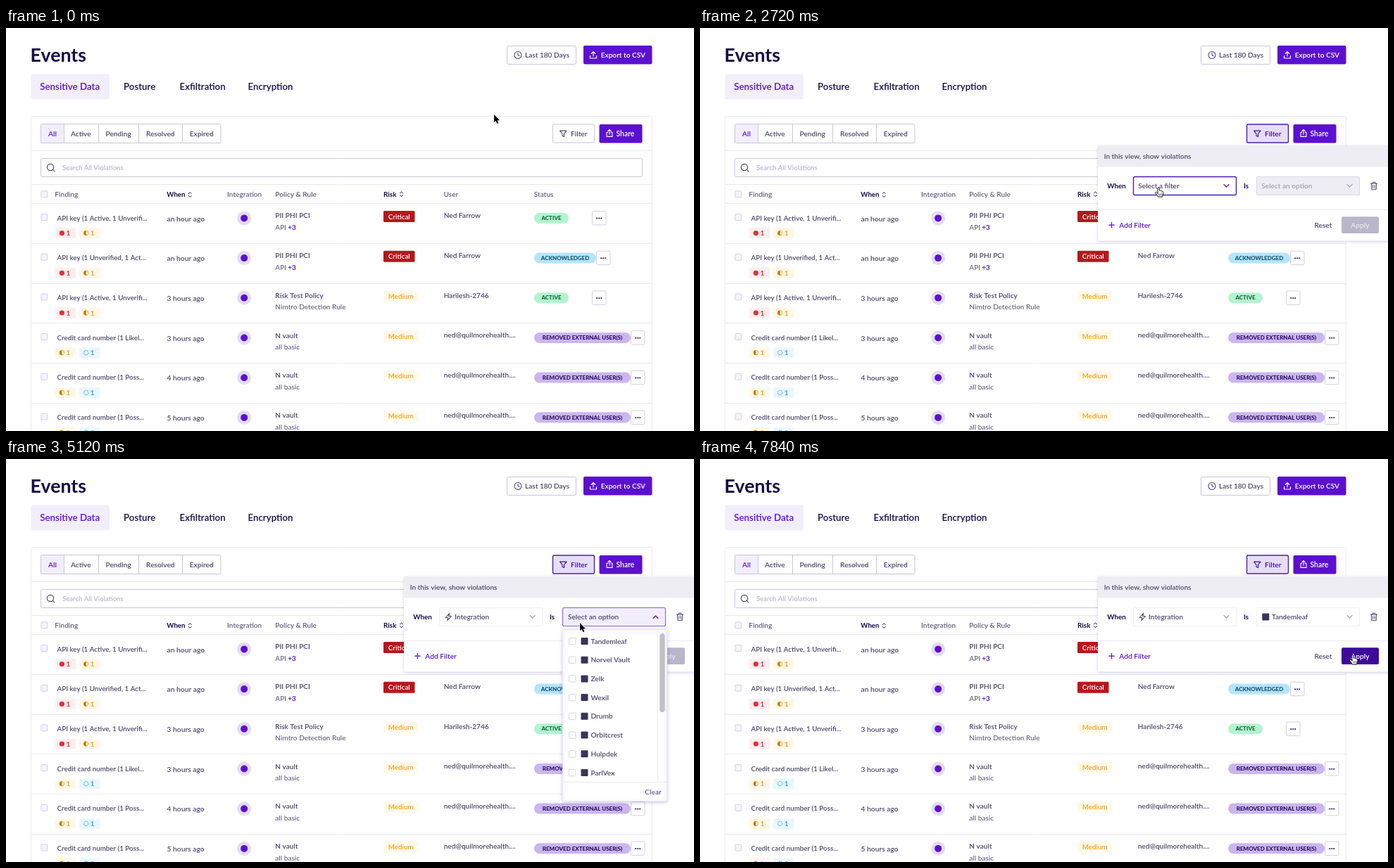
Write an HTML page with a canvas that moves like this. It is 977 px wide and 573 px high and loops after 8000 ms.

```html
<!DOCTYPE html>
<html lang="en">
<head>
<meta charset="utf-8">
<title>Events</title>
<style>
html, body { margin: 0; width: 100%; height: 100%; overflow: hidden; background: #fff; }
canvas { display: block; }
</style>
</head>
<body>
<canvas id="stage" width="977" height="573"></canvas>
<script>
const ctx = document.getElementById('stage').getContext('2d');
const LOOP = 8000;
const PURPLE = '#5b10d0', DEEP = '#3d0a9c', FOCUS = '#4c1fae', INK = '#150b45', TEXT = '#4b4867', MUTED = '#625f7e';
const LILAC = '#f2eefc', LINE = '#ebe9f1', EDGE = '#c9c6d8', PALE = '#b4b1c4';

// Moments at which the interface changes state
const OPEN_PANEL = 1120, ADD_ROW = 2240, OPEN_FIELDS = 2960, PICK_FIELD = 3760,
      OPEN_APPS = 4960, CHECK_APP = 5520, CLOSE_APPS = 6160;
const CLICKS = [1000, 2160, 2880, 3760, 4760, 5440, 6080];

// Pointer stops: time, x, y
const PATH = [
  [0, 693, 123], [160, 693, 123], [900, 803, 152], [1200, 803, 152], [1680, 678, 219],
  [1920, 630, 221], [2240, 630, 221], [2680, 651, 228], [3100, 651, 228], [3460, 658, 298],
  [4000, 658, 298], [4560, 815, 233], [5160, 815, 233], [5440, 806, 259], [5900, 806, 259],
  [6160, 741, 252], [6860, 741, 252], [7680, 927, 280], [8000, 927, 280]
];

const APPS = ['Tandemleaf', 'Norvel Vault', 'Zelk', 'Wexil', 'Drumb', 'Orbitcrest', 'Hulpdek', 'ParlVex'];
const FIELDS = ['Finding', 'Integration', 'Policy', 'Risk', 'User', 'Status'];

const MAIL = 'ned@quilmorehealth....';
const ROWS = [
  ['API key (1 Active, 1 Unverifi...', 'an hour ago', 'PII PHI PCI', 'API', 'Critical', 'Ned Farrow', 'ACTIVE'],
  ['API key (1 Unverified, 1 Act...', 'an hour ago', 'PII PHI PCI', 'API', 'Critical', 'Ned Farrow', 'ACKNOWLEDGED'],
  ['API key (1 Active, 1 Unverifi...', '3 hours ago', 'Risk Test Policy', 'Nimtro Detection Rule', 'Medium', 'Harilesh-2746', 'ACTIVE'],
  ['Credit card number (1 Likel...', '3 hours ago', 'N vault', 'all basic', 'Medium', MAIL, 'REMOVED EXTERNAL USER(S)'],
  ['Credit card number (1 Poss...', '4 hours ago', 'N vault', 'all basic', 'Medium', MAIL, 'REMOVED EXTERNAL USER(S)'],
  ['Credit card number (1 Poss...', '5 hours ago', 'N vault', 'all basic', 'Medium', MAIL, 'REMOVED EXTERNAL USER(S)']
];
const STATUS = {
  'ACTIVE': { fill: '#b4f3cf', ink: '#11613c', width: 49, menu: 832.5 },
  'ACKNOWLEDGED': { fill: '#b5e4fb', ink: '#145072', width: 88, menu: 838.5 },
  'REMOVED EXTERNAL USER(S)': { fill: '#cbb6ef', ink: '#2a0b66', width: 137, menu: 887.5 }
};

// y is the middle of the capital letters
function text(str, x, y, color = TEXT, size = 10.1, weight = 600, align = 'left') {
  ctx.font = `${weight} ${size}px Lato, sans-serif`;
  ctx.fillStyle = color;
  ctx.textAlign = align;
  ctx.fillText(str, x, y + size * 0.36);
}

function box(x, y, w, h, r, fill, stroke, width = 1) {
  ctx.beginPath();
  ctx.roundRect(x, y, w, h, r);
  paint(fill, stroke, width);
}

function disc(x, y, r, fill, stroke, width = 1) {
  ctx.beginPath();
  ctx.arc(x, y, r, 0, Math.PI * 2);
  paint(fill, stroke, width);
}

function paint(fill, stroke, width) {
  if (fill) { ctx.fillStyle = fill; ctx.fill(); }
  if (stroke) { ctx.strokeStyle = stroke; ctx.lineWidth = width; ctx.stroke(); }
}

function shape(d, x, y, stroke, width = 1.2, fill) {
  ctx.save();
  ctx.translate(x, y);
  ctx.lineCap = ctx.lineJoin = 'round';
  ctx.strokeStyle = stroke;
  ctx.lineWidth = width;
  const path = new Path2D(d);
  if (fill) { ctx.fillStyle = fill; ctx.fill(path); }
  if (stroke) ctx.stroke(path);
  ctx.restore();
}

function rule(x1, y1, x2, y2, color = LINE) {
  shape(`M${x1} ${y1}L${x2} ${y2}`, 0, 0, color, 1);
}

function withShadow(blur, offset, draw) {
  ctx.save();
  ctx.shadowColor = 'rgba(80,55,160,.24)';
  ctx.shadowBlur = blur;
  ctx.shadowOffsetY = offset;
  draw();
  ctx.restore();
}

const checkbox = (x, y) => box(x - 4.5, y - 4.5, 9, 9, 1.5, '#f5f4f8', '#d3d0df');
const chevron = (x, y, color, up) => shape(up ? 'M-3.5 2L0-1.5L3.5 2' : 'M-3.5-2L0 1.5L3.5-2', x, y, color, 1.3);
const sorter = (x, y) => shape('M-2-1.5L0-3.3L2-1.5M-2 1.5L0 3.3L2 1.5', x, y, INK, 1);
const upload = (x, y) => shape('M-4.5 1V4.5H4.5V1M0 1.5V-4.8M-2.7-2.2L0-4.8L2.7-2.2', x, y, '#fff', 1.2);

function chip(x, y, kind) {
  const [bg, color] = { red: ['#fdeeef', '#e0303c'], orange: ['#fff8e7', '#f0a01e'], blue: ['#eaf7fe', '#27a8ea'] }[kind];
  box(x, y - 7.5, 29.5, 15, 2, bg);
  const cx = x + 9.7;
  if (kind === 'red') disc(cx, y, 3.6, color);
  if (kind === 'orange') {
    disc(cx, y, 3.2, null, color, 1);
    shape('M0-3.4A3.4 3.4 0 0 0 0 3.4Z', cx, y, null, 1, '#c87508');
  }
  if (kind === 'blue') {
    ctx.setLineDash([1.5, 1.2]);
    disc(cx, y, 3.2, null, color, 1.1);
    ctx.setLineDash([]);
  }
  text('1', x + 15.8, y, color, 10, 700);
}

function drawHeader() {
  text('Events', 34.6, 38, INK, 26.7, 700);
  box(711.5, 25.5, 98, 26, 2, '#fff', EDGE);
  disc(727, 38.5, 5, null, TEXT, 1.1);
  shape('M0-3V0L2.2 1.2', 727, 38.5, TEXT, 1.1);
  text('Last 180 Days', 737, 38.3);
  box(820, 25, 97.5, 26.5, 2, PURPLE);
  upload(834, 38.5);
  text('Export to CSV', 844.7, 38.3, '#fff');

  box(35.5, 65.5, 111.5, 36, 3, LILAC);
  text('Sensitive Data', 48.2, 83.2, PURPLE, 13.4);
  [['Posture', 167], ['Exfiltration', 246.5], ['Encryption', 343.5]]
    .forEach(([label, x]) => text(label, x, 83.2, INK, 13.3));
}

function drawToolbar(filterOn) {
  box(35.5, 125.5, 882, 470, 3, '#fff', LINE);
  box(49.5, 136.5, 32.5, 27, [2, 0, 0, 2], LILAC);
  box(49.5, 136.5, 255.5, 27, 2, null, EDGE);
  [82.5, 131.5, 188.5, 250.5].forEach(x => rule(x, 137, x, 163, EDGE));
  [['All', 66, PURPLE], ['Active', 106.3], ['Pending', 159.7], ['Resolved', 219.3], ['Expired', 277.7]]
    .forEach(([label, x, color = TEXT]) => text(label, x, 150.1, color, 10.2, 600, 'center'));

  box(776.5, 137, 59, 26, 2, filterOn ? '#e6ddf8' : '#fff', filterOn ? FOCUS : EDGE, filterOn ? 1.4 : 1);
  const color = filterOn ? DEEP : TEXT;
  shape('M-4.7-4.2H4.7L1.3 0V4.3L-1.3 3V0Z', 791.3, 150.3, color, 1.1);
  text('Filter', 802, 150.1, color);
  box(842.5, 137, 61, 26.5, 2, PURPLE);
  shape('M-2-1.4H-4V4.7H4V-1.4H2M0 1.8V-5M-2.2-3L0-5.2L2.2-3', 857, 149.7, '#fff', 1.1);
  text('Share', 866.5, 150.1, '#fff', 10.4);

  rule(36, 174.5, 917, 174.5);
  box(49.5, 185.5, 854, 26, 2, '#fff', EDGE);
  disc(63, 198, 4.6, null, TEXT, 1.2);
  shape('M3.3 3.3L5.8 5.8', 63, 198, TEXT, 1.2);
  text('Search All Violations', 80, 198.3, PALE, 9.6, 500);
}

function drawTable() {
  rule(36, 222.5, 917, 222.5);
  checkbox(54.3, 236.3);
  [['Finding', 69.3], ['Integration', 314], ['Policy & Rule', 382.3], ['User', 621.5], ['Status', 749.8]]
    .forEach(([label, x]) => text(label, x, 236.1, MUTED));
  text('When', 228.3, 236.1, INK, 9.7, 700);
  sorter(261.3, 237);
  text('Risk', 536, 236.1, INK, 9.9, 700);
  sorter(561.5, 236.3);
  ROWS.forEach((row, i) => drawRow(row, i, 249.8 + i * 56.7));
}

function drawRow([finding, when, policy, detail, risk, user, status], i, top) {
  rule(36, Math.floor(top) + 0.5, 917, Math.floor(top) + 0.5);
  checkbox(54.3, top + 19.2);
  text(finding, 72.5, top + 20.3, TEXT, 9.8);
  chip(69.7, top + 41.8, i < 3 ? 'red' : 'orange');
  chip(104, top + 41.8, i < 3 ? 'orange' : 'blue');
  text(when, 228.5, top + 21, TEXT, 10.3);
  disc(338.2, top + 20.6, 10, '#e4dbf7');
  disc(338.2, top + 20.6, 5, PURPLE);
  text(policy, 382.3, top + 17);
  text(detail, 382.3, top + 33.6, MUTED, 10.1, 500);
  if (i < 2) text('+3', 400.3, top + 33.6, PURPLE, 10, 700);
  if (risk === 'Critical') {
    box(536, top + 10.2, 44.5, 16, 1.5, '#b7171c');
    text(risk, 542.8, top + 18.2, '#fff', 9.9);
  } else {
    box(536, top + 10.2, 49.5, 16, 1.5, '#fff9ea');
    text(risk, 542.8, top + 18.2, '#f5a214', 9.8);
  }
  text(user, 621.7, top + 16.9);
  const { fill, ink, width, menu } = STATUS[status];
  box(750, top + 13, width, 15, 7.5, fill);
  text(status, 750 + width / 2, top + 20.4, ink, 8, 800, 'center');
  box(menu, top + 10.7, 19.5, 19.5, 2, '#fff', '#d3d0df');
  [-3, 0, 3].forEach(dx => disc(menu + 9.7 + dx, top + 20.8, 1, INK));
}

function select(x, label, { hover, open, off, icon } = {}) {
  const border = open ? '#8a5fd8' : hover ? FOCUS : off ? '#dad7e4' : '#f0eef5';
  box(x + 0.5, 211.5, 146, 26, 2, open ? LILAC : off ? '#efedf4' : '#fff', border, hover && !open ? 1.4 : 1.1);
  let textX = x + (open ? 8 : 7.3);
  if (icon === 'bolt') {
    shape('M1.5-5.2L-4.2 1H-.4L-1.5 5.2L4.2-1H.4Z', x + 13.3, 224.5, TEXT, 1.1);
    textX = x + 22;
  } else if (icon === 'app') {
    box(x + 8.3, 219.5, 10, 10, 1, '#383557');
    textX = x + 22;
  }
  text(label, textX, 224.4, off ? '#a5a2b6' : TEXT);
  chevron(x + 132.5, 224.5, open || hover ? PURPLE : '#aaa7ba', open);
}

function drawPanel(t, pointer) {
  const rowShown = t >= ADD_ROW, picked = t >= PICK_FIELD, ready = t >= CLOSE_APPS;
  const bottom = rowShown ? 302.5 : 242.5;
  const footer = rowShown ? 280.2 : 220.2;
  withShadow(4, 1.5, () => box(565, 167, 430, bottom - 167, 2, '#fff'));
  box(565, 167, 430, rowShown ? 30.5 : 31, 0, '#efedf4');
  text(rowShown ? 'In this view, show violations' : 'No filters are applied to this view', 573.7, 182.5, TEXT, 10);

  if (rowShown) {
    text('When', 578.3, 224.4, INK, 9.8, 700);
    text('Is', 772, 224.4, INK, 9.8, 700);
    const appsOpen = t >= OPEN_APPS && !ready;
    select(615, picked ? 'Integration' : 'Select a filter', {
      icon: picked && 'bolt',
      hover: !picked && (within(pointer, 615, 211, 147, 27) || t >= OPEN_FIELDS)
    });
    select(790, ready ? APPS[0] : 'Select an option', {
      icon: ready && 'app', off: !picked, open: appsOpen,
      hover: picked && !ready && within(pointer, 790, 211, 147, 27)
    });
    shape('M-4.6-3.4H4.6M-1.8-3.4V-5.3H1.8V-3.4M-3.7-3.4L-3.2 5.2H3.2L3.7-3.4M-1.3-1V2.9M1.3-1V2.9', 957, 224.5, TEXT, 1);
    rule(565, 258.5, 977, 258.5);
  }

  shape('M-3.8 0H3.8M0-3.8V3.8', 584.5, footer, PURPLE, 1.2);
  text('Add Filter', 595.3, footer, PURPLE, 10.2);
  text('Reset', 872.5, footer);
  const hot = ready && within(pointer, 911, 268, 53, 24);
  box(911, footer - 12, 53, 23.7, 2, hot ? DEEP : ready ? PURPLE : '#b9b5cb');
  text('Apply', 937.4, footer, ready ? '#fff' : '#e9e7f0', 10.2, 600, 'center');
}

function drawFieldMenu() {
  withShadow(5, 1.5, () => box(615.5, 242.5, 147, 167, 2, '#fff'));
  box(616, 272.5, 146, 26, 0, LILAC);
  FIELDS.forEach((label, i) => text(label, 624, 259 + i * 26.7));
}

function drawAppMenu(checked) {
  withShadow(5, 1.5, () => box(790.5, 242.5, 148, 244, 2, '#fff', '#e8e6ee'));
  rule(925.5, 243, 925.5, 459, '#ebeaee');
  box(928.3, 248, 7.4, 112, 3.7, '#c1c0c3');
  APPS.forEach((label, i) => {
    const y = 259 + i * 26.7;
    const on = checked && i === 0;
    box(799.5, y - 4.7, 9.5, 9.5, 1.5, on ? PURPLE : '#fff', on ? PURPLE : '#d6d3e0');
    if (on) shape('M-2.4 0L-.7 1.8L2.5-1.8', 804.2, y, '#fff', 1.3);
    box(816.5, y - 5, 10, 10, 1, '#383557');
    text(label, 830.5, y);
  });
  rule(791, 459.5, 938, 459.5);
  text('Clear', 907.3, 473, MUTED, 10.2);
}

const within = ([px, py], x, y, w, h) => px >= x && px <= x + w && py >= y && py <= y + h;

function slope(k, axis) {
  const prev = PATH[k - 1], here = PATH[k], next = PATH[k + 1];
  if (!prev || !next || (here[axis] - prev[axis]) * (next[axis] - here[axis]) <= 0) return 0;
  return (next[axis] - prev[axis]) / (next[0] - prev[0]);
}

// Smooth travel that rests wherever two neighbouring stops are equal
function pointerAt(t) {
  const k = PATH.findIndex(p => p[0] > t) - 1;
  const a = PATH[k], b = PATH[k + 1], span = b[0] - a[0], u = (t - a[0]) / span;
  return [1, 2].map(axis =>
    a[axis] + (b[axis] - a[axis]) * u * u * (3 - 2 * u) +
    span * u * (1 - u) * ((1 - u) * slope(k, axis) - u * slope(k + 1, axis)));
}

function overLink(t, p) {
  if (within(p, 776, 137, 60, 27)) return true;
  if (t < OPEN_PANEL) return false;
  if (t < ADD_ROW + 80) return within(p, 576, 209, 66, 24);
  if (t < PICK_FIELD) return within(p, 615, 211, 147, 27) || (t >= OPEN_FIELDS && within(p, 615, 242, 147, 167));
  if (t < OPEN_APPS) return within(p, 790, 211, 147, 27);
  if (t < CLOSE_APPS) return within(p, 791, 246, 134, 213);
  return within(p, 911, 268, 53, 24);
}

function drawPointer(t, [x, y]) {
  CLICKS.forEach(start => {
    const age = (t - start) / 340;
    if (age >= 0 && age < 1) disc(x + 1, y, 36, `rgba(255,238,120,${0.3 * (1 - age)})`);
  });
  if (overLink(t, [x, y])) {
    const top = y - 1.2;
    shape('M-1.2 .8C-1.2-.8 1.2-.8 1.2 .8V4.2C2 3.6 3.2 3.9 3.4 4.8C4.3 4.4 5.3 4.8 5.4 5.7C6.3 5.5 7 6 7 7C7 10 6 10.5 5.6 13.3H-.6C-1.2 11.4-3.4 9.6-4.4 7.6C-4.9 6.4-3.3 5.8-2.5 6.8L-1.2 8.2Z',
      x, top, '#111', 1, '#fff');
    shape('M1 9V11.2M3 9V11.2M5 9V11.2', x, top, '#111', 0.7);
  } else {
    const arrow = 'M0 0V11.3L2.6 8.9L4.4 13.1L6.4 12.2L4.6 8.2H8.1Z';
    shape(arrow, x, y, '#fff', 1.8);
    shape(arrow, x, y, null, 0, '#000');
  }
}

function draw(t) {
  const pointer = pointerAt(t);
  ctx.fillStyle = '#fff';
  ctx.fillRect(0, 0, 977, 573);
  drawHeader();
  drawToolbar(t >= OPEN_PANEL);
  drawTable();
  if (t >= OPEN_PANEL) drawPanel(t, pointer);
  if (t >= OPEN_FIELDS && t < PICK_FIELD) drawFieldMenu();
  if (t >= OPEN_APPS && t < CLOSE_APPS) drawAppMenu(t >= CHECK_APP);
  drawPointer(t, pointer);
}

const begin = performance.now();
function tick() {
  draw((performance.now() - begin) % LOOP);
  requestAnimationFrame(tick);
}
tick();
</script>
</body>
</html>
```
